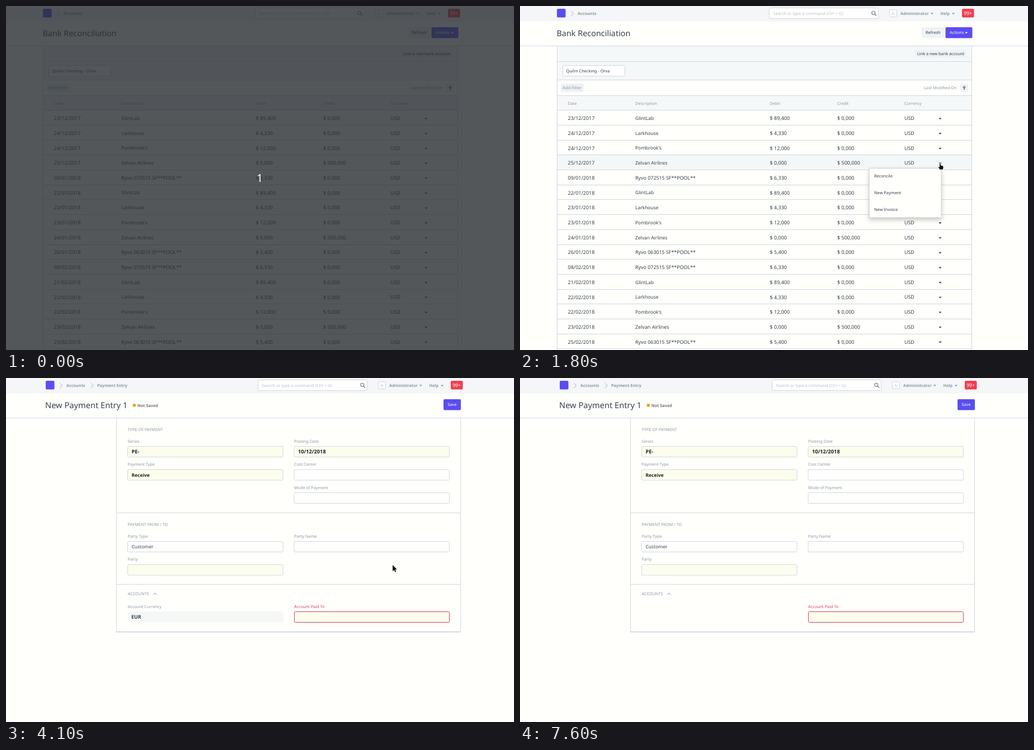
Recreate the animation shown at these times as an HTML page with a canvas. Size 908 by 616 pixels, loop 8.1 s.

```html
<!DOCTYPE html>
<html lang="en">
<head>
<meta charset="utf-8">
<title>Bank Reconciliation</title>
<style>
html, body { margin: 0; width: 100%; height: 100%; overflow: hidden; background: #fffffc; }
canvas { display: block; }
</style>
</head>
<body>
<canvas id="stage" width="908" height="616"></canvas>
<script>
const ctx = document.getElementById('stage').getContext('2d');
const LOOP = 8100, STEP = 100;
const PAGE = '#fffffc', PANEL = '#f5f8f8', LINE = '#d1d8dd', GREY = '#8d99a6',
  INK = '#36414c', BLUE = '#5b4df2', CHIP = '#eff3f5', NEEDED = '#fdfdee', RED = '#d0405a';

const DATES = ['23/12/2017', '24/12/2017', '24/12/2017', '25/12/2017', '09/01/2018', '22/01/2018',
  '23/01/2018', '23/01/2018', '24/01/2018', '26/01/2018', '08/02/2018', '21/02/2018',
  '22/02/2018', '22/02/2018', '23/02/2018', '25/02/2018'];
const SHOP = ['GlintLab', '89,400', '0,000'], CAFE = ['Larkhouse', '4,330', '0,000'],
  DINER = ["Pombrook's", '12,000', '0,000'], PLANE = ['Zelvan Airlines', '0,000', '500,000'],
  RIDE_A = ['Ryvo 072515 SF**POOL**', '6,330', '0,000'],
  RIDE_B = ['Ryvo 063015 SF**POOL**', '5,400', '0,000'];
const WEEK = [SHOP, CAFE, DINER, PLANE];
const ROWS = [...WEEK, RIDE_A, ...WEEK, RIDE_B, RIDE_A, ...WEEK, RIDE_B];

// Pointer positions: [time, x, y, shape], each held until the next
const TRACK = [[0]];
for (let i = 0; i < 8; i++) {
  const p = 1 - (1 - i / 7) ** 1.5;
  TRACK.push([500 + i * STEP, 900 - 149 * p, 268 + 14 * p, i < 7 ? 'arrow' : 'hand']);
}
TRACK.push(
  [2000, 734, 291, 'hand'], [2100, 700, 311, 'hand'], [2200, 668, 329, 'hand'],
  [2300, 656, 334, 'hand'], [2400, 691, 335, 'hand'], [3000, 691, 335, 'arrow'],
  [4900, 690, 335, 'arrow'], [5100, 630, 338, 'arrow'], [5200, 500, 340, 'arrow'],
  [5400, 380, 346, 'beam'], [5600, 376, 348, 'beam'], [5700, 372, 349, 'beam'],
  [6700, 298, 217, 'arrow'], [7200, 430, 187, 'arrow'], [7300, 700, 125, 'arrow'],
  [7400, 885, 85, 'arrow'], [7600]);

function rect(x, y, w, h, fill) {
  ctx.fillStyle = fill;
  ctx.fillRect(x, y, w, h);
}

function box(x, y, w, h, fill, border, r = 2) {
  ctx.beginPath();
  const d = border ? 0.5 : 0;
  ctx.roundRect(x + d, y + d, w - 2 * d, h - 2 * d, r);
  ctx.fillStyle = fill;
  ctx.fill();
  if (border) stroke(border);
}

function stroke(color, width = 1) {
  ctx.strokeStyle = color;
  ctx.lineWidth = width;
  ctx.stroke();
}

function poly(points, x = 0, y = 0) {
  ctx.beginPath();
  for (let i = 0; i < points.length; i += 2) ctx.lineTo(x + points[i], y + points[i + 1]);
}

// y is the middle of the capitals
function text(str, x, y, color = INK, size = 7.4, weight = 400) {
  ctx.font = `${weight} ${size}px "Noto Sans", sans-serif`;
  ctx.fillStyle = color;
  ctx.fillText(str, x, y + size * 0.36);
}

function caret(x, y, color) {
  poly([-2.6, -1.3, 2.6, -1.3, 0, 1.5], x, y);
  ctx.fillStyle = color;
  ctx.fill();
}

function chevron(x, y) {
  poly([-2.2, -4.2, 2.2, 0, -2.2, 4.2], x, y);
  stroke('#a5afb8');
}

function nav(shift, crumbs) {
  rect(0, 0, 908, 27, '#f4f6f7');
  rect(0, 27, 908, 1, '#f9fafa');
  rect(0, 71, 908, 1, '#d6dae6');
  ctx.save();
  ctx.translate(shift, 0);
  box(66, 5, 15.5, 15.5, BLUE);
  crumbs.forEach((name, i) => {
    chevron(93.5 + i * 55.5, 13.5);
    text(name, 103 + i * 55, 13.8, GREY, 7.3, 700);
  });
  box(445, 3, 196, 20, '#fff', LINE);
  text('Search or type a command (Ctrl + G)', 452.5, 13.3, '#b9c1c8', 7.4);
  ctx.beginPath();
  ctx.arc(631.8, 12.3, 3, 0, 7);
  stroke('#6c7680', 1.1);
  poly([634, 14.5, 636.8, 17.4]);
  stroke('#6c7680', 1.4);
  box(660, 6, 14, 14, '#fafbfb', LINE);
  text('A', 664.3, 13.2, '#c6cdd3', 7.6);
  text('Administrator', 680, 13.4, GREY, 7.2, 700);
  caret(736.3, 13.6, GREY);
  text('Help', 751.5, 13.4, GREY, 7.2, 700);
  caret(774.5, 13.8, GREY);
  box(790, 5, 21.5, 15.5, '#f03e52');
  text('99+', 793.2, 13, '#fff', 8.6);
  ctx.restore();
}

function listPage(hover, menu) {
  nav(0, ['Accounts']);
  text('Bank Reconciliation', 65.5, 49, INK, 14.4);
  box(718, 38, 40.5, 19.5, CHIP);
  text('Refresh', 725, 47.8);
  box(760.5, 38, 48, 19.5, BLUE);
  text('Actions', 768, 47.8, '#fff');
  caret(797.8, 48, '#fff');

  rect(66, 72, 742, 61, PANEL);
  rect(66, 161, 742, 25, PANEL);
  if (hover) rect(66, 267, 742, 26, '#f4f7f7');
  for (const y of [99, 132, 160]) rect(66, y, 742, 1, LINE);
  box(706, 78.5, 91.5, 14, CHIP);
  text('Link a new bank account', 710, 85.5, INK, 7.3);
  box(76, 106, 112, 20, '#fff', LINE);
  text('Quilm Checking - Orva', 82.5, 116);
  box(73, 139, 40.5, 15, '#eef1f3');
  text('Add Filter', 76, 146.6, GREY, 7.5);
  text('Last Modified On', 722, 146.2, GREY, 7.3);
  box(786.5, 139, 15, 15, CHIP);
  poly([0, -3.6, 3.4, 0, 1.1, 0, 1.1, 3.4, -1.1, 3.4, -1.1, 0, -3.4, 0], 794, 146.3);
  ctx.fillStyle = '#7c8894';
  ctx.fill();

  const cols = [85.5, 206, 446.5, 567, 687];
  ['Date', 'Description', 'Debit', 'Credit', 'Currency'].forEach((h, i) =>
    text(h, cols[i], 174, GREY, 7.25));
  ROWS.forEach(([name, debit, credit], i) => {
    const y = 201 + i * 26.69;
    rect(66, Math.round(y - 14.7), 742, 1, LINE);
    text(DATES[i], cols[0], y, INK, 9);
    text(name, cols[1], y, INK, i % 5 === 4 || i > 8 && name[0] === 'R' ? 8.9 : 8.45);
    text('$ ' + debit, cols[2], y, INK, 9);
    text('$ ' + credit, cols[3], y, INK, 9);
    text('USD', cols[4], y, INK, 8.9);
    caret(751, y + 0.8, INK);
  });
  rect(66, 613, 742, 1, LINE);
  rect(66, 72, 1, 544, LINE);
  rect(807, 72, 1, 544, LINE);

  if (menu) {
    ctx.save();
    ctx.shadowColor = 'rgba(0,0,0,.22)';
    ctx.shadowBlur = 8;
    ctx.shadowOffsetY = 4;
    box(624, 290, 129.5, 89, PAGE, null, 1.5);
    ctx.restore();
    box(623.5, 290, 130, 89.5, PAGE, '#c8cdd1', 1.5);
    ['Reconcile', 'New Payment', 'New Invoice'].forEach((s, i) =>
      text(s, 633, 304.8 + i * 29.7));
  }
}

function field(label, x, y, value = '', fill = '#fffffe', weight = 400, size = 8.45) {
  text(label, x, y, GREY, 7.3);
  box(x - 0.5, y + 9, 278.5, 20, fill, LINE);
  text(value, x + 7, y + 19, weight > 400 ? '#1c2126' : INK, size, weight);
}

function formPage(currency) {
  nav(5, ['Accounts', 'Payment Entry']);
  text('New Payment Entry 1', 70, 49, INK, 14.65);
  ctx.beginPath();
  ctx.arc(229.3, 48.8, 2.9, 0, 7);
  ctx.fillStyle = '#eda21f';
  ctx.fill();
  text('Not Saved', 234.8, 49, '#6c7680', 7.3, 700);
  box(782, 38, 31, 19.5, BLUE);
  text('Save', 789.3, 47.8, '#fff');

  for (const y of [241, 369]) rect(198, y, 614, 1, LINE);
  rect(197, 72, 1, 383, LINE);
  rect(812, 72, 1, 383, LINE);
  rect(197, 454, 616, 1, '#c3c9d2');
  rect(198, 455, 614, 1, '#eceeef');

  const L = 217.5, R = 515;
  text('TYPE OF PAYMENT', L, 92.8, GREY, 7.35);
  text('PAYMENT FROM / TO', L, 262.8, GREY, 7.35);
  text('ACCOUNTS', L, 386.5, GREY, 7.3);
  poly([-3, 1.6, 0, -1.6, 3, 1.6], 266.3, 386.5);
  stroke(GREY);

  field('Series', L, 113, 'PE-', NEEDED, 700, 9);
  field('Payment Type', L, 154.5, 'Receive', NEEDED, 700);
  field('Posting Date', R, 113, '10/12/2018', NEEDED, 700, 9.2);
  field('Cost Center', R, 154.5);
  field('Mode of Payment', R, 196);
  field('Party Type', L, 283, 'Customer');
  field('Party', L, 324.5, '', NEEDED);
  field('Party Name', R, 283);
  if (currency) {
    text('Account Currency', L, 409, GREY, 7.3);
    box(L, 418, 278, 19.5, '#f5f7f7');
    text('EUR', 224, 427.8, INK, 9, 700);
  }
  text('Account Paid To', R, 409, RED, 7.3);
  box(R, 418, 278, 20, NEEDED, RED);
}

const ARROW = [0, 0, 0, 11, 2.6, 8.7, 4.5, 12.6, 6.3, 11.8, 4.5, 8, 7.8, 7.8];
const HAND = [-1, 0.5, 0.7, 0.5, 0.9, 3.6, 5.2, 4.6, 5.6, 7.4, 4.6, 10.8, -0.4, 10.8, -3.4, 6.6, -2.6, 5.8, -1, 7];

function pointer(x, y, shape) {
  if (!shape) return;
  if (shape === 'beam') {
    poly([-2.2, -5, 2.2, -5], x, y); stroke('#333');
    poly([0, -5, 0, 5], x, y); stroke('#333', 1.2);
    poly([-2.2, 5, 2.2, 5], x, y); stroke('#333');
    return;
  }
  poly(shape === 'hand' ? HAND : ARROW, x, y);
  ctx.closePath();
  ctx.lineJoin = 'round';
  stroke('#fff', 1.6);
  ctx.fillStyle = '#111';
  ctx.fill();
}

function veil(t) {
  if (t < 3000 || t >= 4100) return 0;
  return t >= 4000 ? 0.25 : Math.min(0.5, 0.17 * ((t - 3000) / STEP + 1));
}

function draw(now) {
  const t = Math.floor(now % LOOP / STEP) * STEP;
  rect(0, 0, 908, 616, PAGE);
  if (t < 4000) listPage(t >= 700 && t < 3000, t >= 1800 && t < 3000);
  else formPage(t < 4300);
  rect(0, 28, 908, 588, `rgba(247,251,250,${veil(t)})`);
  if (t >= 5700 && t < 6300) rect(225, 338, 1, 11, '#222');
  const [, x, y, shape] = TRACK.findLast(p => p[0] <= t);
  pointer(x, y, shape);
  if (t < 100) {
    rect(0, 0, 908, 616, 'rgba(40,45,51,.8)');
    text('1', 448, 308, '#fff', 19.5);
  }
  requestAnimationFrame(draw);
}

ctx.textRendering = 'geometricPrecision';
requestAnimationFrame(draw);
</script>
</body>
</html>
```
